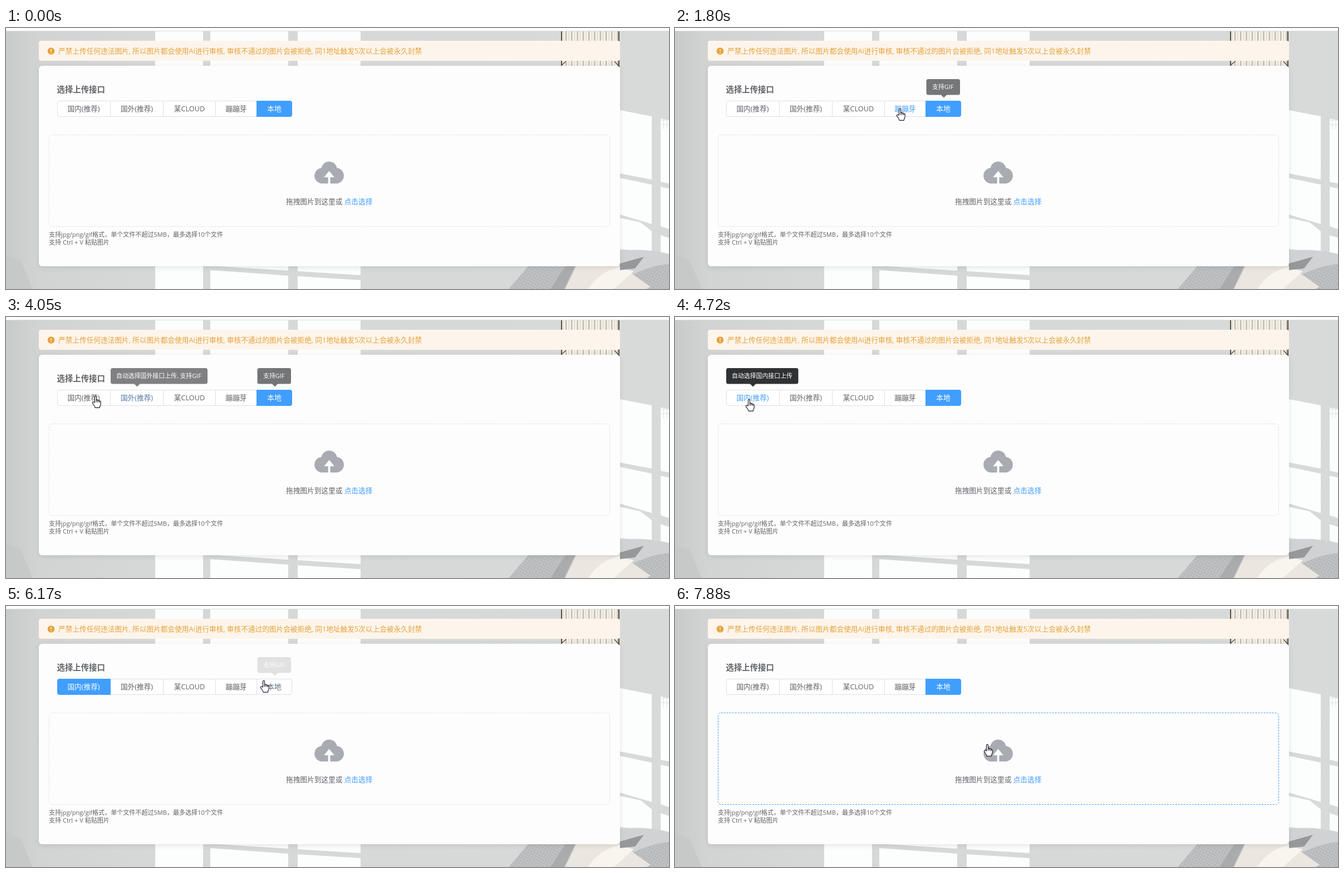
Animation, 1191 px wide and 470 px high, one loop 8000 ms. Source, as an HTML page:

```html
<!DOCTYPE html>
<html lang="zh-CN">
<head>
<meta charset="utf-8">
<title>上传</title>
<style>
html, body { margin: 0; width: 100%; height: 100%; overflow: hidden; background: #d6d8d8; }
svg { display: block; width: 1191px; height: 470px; }
text { font: 12.68px "Open Sans", "Noto Sans CJK SC", "Noto Sans CJK", sans-serif; fill: #606266; white-space: pre; }
.small { font-size: 11.05px; }
.title { font-size: 14.4px; font-weight: 700; }
.warn { fill: #e6a23c; }
.link { fill: #409eff; }
.tab { fill: #fff; stroke: #dcdfe6; }
.on { fill: #409eff; opacity: 0; }
.tip { opacity: 0; }
.tip rect, .tip path { fill: #303133; }
.tip text { fill: #fff; font-size: 10.9px; }

.anim { animation: 8s linear infinite; }
.ease { animation-timing-function: ease-in-out; }
.step { animation-timing-function: step-end; }

/* selected state */
@keyframes on1 { 0%, 60.25% { opacity: 0 } 63.5%, 86.4% { opacity: 1 } 90%, 100% { opacity: 0 } }
@keyframes on4 { 0%, 25% { opacity: 0 } 28.5%, 38.9% { opacity: 1 } 42.5%, 100% { opacity: 0 } }
@keyframes on5 {
  0%, 25% { opacity: 1 } 28.5%, 38.9% { opacity: 0 } 42.5%, 60.25% { opacity: 1 }
  63.5%, 86.4% { opacity: 0 } 90%, 100% { opacity: 1 }
}
/* label colours */
@keyframes ink1 {
  0%, 50.6% { fill: #606266 } 54%, 60.25% { fill: #409eff } 63.5%, 86.4% { fill: #fff } 90%, 100% { fill: #606266 }
}
@keyframes ink2 {
  0%, 48.2% { fill: #606266 } 50.2% { fill: #547aa8 } 53%, 64.7% { fill: #606266 }
  65.8% { fill: #5a6e88 } 67.8%, 100% { fill: #606266 }
}
@keyframes ink4 {
  0%, 18.6% { fill: #606266 } 22%, 25% { fill: #409eff } 28.5%, 38.9% { fill: #fff } 42.5%, 100% { fill: #606266 }
}
@keyframes ink5 {
  0%, 25% { fill: #fff } 28.5%, 30.5% { fill: #606266 } 33.5%, 38.9% { fill: #409eff }
  42.5%, 60.25% { fill: #fff } 63.5%, 76.2% { fill: #606266 } 79.5%, 86.4% { fill: #409eff } 90%, 100% { fill: #fff }
}
/* tooltips */
@keyframes tip1 { 0%, 51% { opacity: 0 } 53.5%, 68.5% { opacity: 1 } 71%, 100% { opacity: 0 } }
@keyframes tip2 {
  0%, 49.125% { opacity: 0 } 51.6%, 52.5% { opacity: 1 } 55%, 65.875% { opacity: 0 }
  68.375%, 70.25% { opacity: 1 } 72.75%, 100% { opacity: 0 }
}
@keyframes tip5 {
  0%, 16.1% { opacity: 0 } 18.2%, 21.6% { opacity: 1 } 24.3%, 30.75% { opacity: 0 }
  33.25%, 49.75% { opacity: 1 } 52.4%, 76.8% { opacity: 0 } 79.3%, 95% { opacity: 1 } 97.5%, 100% { opacity: 0 }
}
@keyframes drop {
  0%, 5.75% { stroke: #dcdfe6 } 9%, 11.25% { stroke: #409eff } 14.75%, 93.5% { stroke: #dcdfe6 } 97%, 100% { stroke: #409eff }
}
/* pointer */
@keyframes show { 0% { opacity: 0 } 5.75%, 100% { opacity: 1 } }
@keyframes hand { 0% { opacity: 1 } 11.25% { opacity: 0 } 15% { opacity: 1 } 64.9% { opacity: 0 } 76.2% { opacity: 1 } 91.9% { opacity: 0 } 93.4%, 100% { opacity: 1 } }
@keyframes arrow { 0% { opacity: 0 } 11.25% { opacity: 1 } 15% { opacity: 0 } 64.9% { opacity: 1 } 76.2% { opacity: 0 } 91.9% { opacity: 1 } 93.4%, 100% { opacity: 0 } }
@keyframes move {
  0%, 5.75% { transform: translate(704px, 312px) }
  7% { transform: translate(708px, 304px) }
  8.5% { transform: translate(726px, 262px) }
  9.75% { transform: translate(744px, 215px) }
  10.5% { transform: translate(742px, 203px) }
  11.25% { transform: translate(708px, 190px) }
  12.25% { transform: translate(640px, 167px) }
  13.25% { transform: translate(573px, 149px) }
  14.75%, 16% { transform: translate(514px, 138px) }
  18.1% { transform: translate(470px, 140px) }
  20% { transform: translate(428px, 144px) }
  21.5%, 26.9% { transform: translate(404px, 145px) }
  28.75% { transform: translate(420px, 146px) }
  31.5% { transform: translate(470px, 142px) }
  33.5%, 43.1% { transform: translate(485px, 141px) }
  45.5% { transform: translate(400px, 145px) }
  47.25% { transform: translate(240px, 144px) }
  48.1%, 49.4% { transform: translate(187px, 143px) }
  50.6%, 51.8% { transform: translate(161px, 142px) }
  54.5% { transform: translate(142px, 146px) }
  58.1%, 63.1% { transform: translate(133px, 148px) }
  64.6% { transform: translate(190px, 138px) }
  65.6% { transform: translate(310px, 116px) }
  66.2% { transform: translate(386px, 98px) }
  66.8% { transform: translate(407px, 92px) }
  67.3% { transform: translate(438px, 85px) }
  67.87%, 69.1% { transform: translate(470px, 76px) }
  70.25%, 70.6% { transform: translate(553px, 60px) }
  72.25% { transform: translate(620px, 64px) }
  73.25% { transform: translate(648px, 86px) }
  74.1% { transform: translate(636px, 112px) }
  74.9% { transform: translate(600px, 138px) }
  75.6% { transform: translate(550px, 147px) }
  76.4% { transform: translate(500px, 142px) }
  77.1%, 80.75% { transform: translate(463px, 134px) }
  83.1%, 90.6% { transform: translate(458px, 135px) }
  92.5% { transform: translate(485px, 172px) }
  94.4% { transform: translate(515px, 215px) }
  96.25%, 96.6% { transform: translate(548px, 243px) }
  98.5%, 100% { transform: translate(561px, 249px) }
}
</style>
</head>
<body>
<svg viewBox="0 0 1191 470">
  <defs>
    <linearGradient id="wall">
      <stop offset="0" stop-color="#c9caca"/>
      <stop offset=".05" stop-color="#d2d3d3"/>
      <stop offset=".2" stop-color="#d6d8d8"/>
      <stop offset="1" stop-color="#d8dada"/>
    </linearGradient>
    <pattern id="knit" width="5" height="5" patternUnits="userSpaceOnUse" patternTransform="rotate(28)">
      <rect width="5" height="5" fill="#c3c4c5"/>
      <path d="M0 1H5M1 0V5" stroke="#b0b1b3"/>
    </pattern>
    <pattern id="bars" x="1003" width="10.3" height="70" patternUnits="userSpaceOnUse">
      <path d="M3 0V70" stroke="#85796a"/>
      <path d="M8 0V70" stroke="#d8d0c2"/>
    </pattern>
    <filter id="shade" x="-5%" y="-5%" width="110%" height="112%">
      <feDropShadow dx="0" dy="2" stdDeviation="4" flood-opacity=".1"/>
    </filter>
  </defs>

  <!-- room -->
  <rect width="1191" height="470" fill="url(#wall)"/>
  <path d="M0 410L26 418 48 470H0Z" fill="#c7c8c8"/>
  <g fill="#fcfdfd">
    <path d="M268 5H354V70H268ZM367 5H507V70H367ZM524 5H637V70H524Z"/>
    <path d="M268 425H354V470H268ZM381 429H507V437ZM524 425H637V445L524 438ZM367 436L507 446V470H367ZM524 447L637 454V470H524Z"/>
    <path d="M1103 148L1160 159V273L1103 262ZM1103 270L1160 282V353L1103 336ZM1176 163L1191 166V280L1176 277ZM1176 286L1191 289V362L1176 357ZM1103 342L1140 350 1160 366V404L1103 398ZM1176 373L1191 378V407L1176 404Z"/>
  </g>
  <path d="M1176 166H1191M1176 174H1191M1181 163V182M1187 164V182" stroke="#dfe1e1" fill="none"/>
  <rect x="997" y="5" width="105" height="65" fill="#f3efe7"/>
  <rect x="997" y="5" width="105" height="65" fill="url(#bars)"/>
  <path d="M998 5V70M1101 5V70" stroke="#5a4d40" stroke-width="2"/>
  <path d="M997 68L1006 60M1093 60L1102 70" stroke="#5a4d40" stroke-width="1.5"/>
  <path d="M903 470L938 429H1060L1010 470Z" fill="url(#knit)"/>
  <path d="M978 470L1005 429H1022L1002 470Z" fill="#a9abac"/>
  <path d="M1103 401Q1150 396 1191 407V470H1103Z" fill="#d0d2d3"/>
  <path d="M1120 447Q1160 427 1191 425V470H1110Z" fill="url(#knit)"/>
  <path d="M1004 470L1024 429H1105L1158 466 1150 470Z" fill="#ebe6df"/>
  <path d="M1046 470Q1064 440 1100 431L1128 438 1092 470Z" fill="#f8f4ee"/>
  <path d="M1103 424L1146 412 1130 433 1103 436Z" fill="#969899"/>
  <rect width="1191" height="5" fill="#fdfdfd"/>
  <path d="M0 5.5H1191" stroke="#dcdede"/>

  <!-- notice -->
  <rect x="59" y="23" width="1044" height="36" rx="4" fill="#fdf5eb"/>
  <circle cx="81" cy="41.5" r="6.3" fill="#e6a23c"/>
  <path d="M81 38V42.2M81 44V45.4" stroke="#fff" stroke-width="1.4"/>
  <text class="warn" x="94" y="46">严禁上传任何违法图片, 所以图片都会使用Ai进行审核, 审核不通过的图片会被拒绝, 同1地址触发5次以上会被永久封禁</text>

  <!-- card -->
  <rect x="59" y="68" width="1044" height="361" rx="6" fill="#fdfdfd" filter="url(#shade)"/>
  <text class="title" x="91.5" y="116">选择上传接口</text>

  <g class="tab">
    <rect x="92.5" y="131.5" width="421" height="28" rx="3.5"/>
    <path d="M187.5 132V159M282.5 132V159M376.5 132V159M450.5 132V159"/>
  </g>
  <path class="on anim ease" style="animation-name:on1" d="M96 131H188V160H96Q92 160 92 156V135Q92 131 96 131Z"/>
  <path class="on anim ease" style="animation-name:on4" d="M376 131H451V160H376Z"/>
  <path class="on anim ease" style="animation-name:on5" d="M450 131H510Q514 131 514 135V156Q514 160 510 160H450Z"/>
  <g text-anchor="middle">
    <text class="anim ease" style="animation-name:ink1" x="139.5" y="150">国内(推荐)</text>
    <text class="anim ease" style="animation-name:ink2" x="235" y="150">国外(推荐)</text>
    <text x="329.5" y="150">某CLOUD</text>
    <text class="anim ease" style="animation-name:ink4" x="413.5" y="150">蹦蹦芽</text>
    <text class="anim ease" style="animation-name:ink5" x="482" y="150">本地</text>
  </g>

  <rect class="anim ease" style="animation-name:drop" x="77.5" y="192.5" width="1007" height="165" rx="5" fill="none" stroke="#dcdfe6" stroke-dasharray="3 2"/>
  <path transform="translate(550.4 229.2) scale(.0589)" fill="#a8abb2" d="M544 864V672h128L512 480 352 672h128v192H304A240 240 0 0 1 64 624c0-123 93-223 212.6-237.2A240 240 0 0 1 512 192a240 240 0 0 1 235.4 194.8C867 400.5 960 501 960 624a240 240 0 0 1-240 240Z"/>
  <text x="503" y="317">拖拽图片到这里或 <tspan class="link">点击选择</tspan></text>
  <text class="small" x="77" y="375.5">支持jpg/png/gif格式，单个文件不超过5MB，最多选择10个文件</text>
  <text class="small" x="77" y="390">支持 Ctrl + V 粘贴图片</text>

  <!-- tooltips -->
  <g class="tip anim" style="animation-name:tip1">
    <rect x="92" y="92" width="129.5" height="28.5" rx="3.5"/>
    <path d="M134.5 120H145.5L140 125.5Z"/>
    <text x="102" y="110">自动选择国内接口上传</text>
  </g>
  <g class="tip anim" style="animation-name:tip2">
    <rect x="188" y="92" width="174" height="28.5" rx="3.5"/>
    <path d="M230 120H241L235.5 125.5Z"/>
    <text x="198" y="110">自动选择国外接口上传, 支持GIF</text>
  </g>
  <g class="tip anim" style="animation-name:tip5">
    <rect x="451.5" y="92" width="60.5" height="28.5" rx="3.5"/>
    <path d="M477.5 120H488.5L483 125.5Z"/>
    <text x="462" y="110">支持GIF</text>
  </g>

  <!-- pointer -->
  <g class="anim step" style="animation-name:show">
    <g class="anim" style="animation-name:move" fill="#fff" stroke="#1c1c28" stroke-width="1.2" stroke-linejoin="round">
      <path class="anim step" style="animation-name:hand" d="M-1.5 12V1.8C-1.5 0 1.5 0 1.5 1.8V8C1.8 6.6 4 6.8 4.1 8.4 4.6 7.4 6.6 7.8 6.7 9.4 7.4 8.6 9.2 9.2 9.2 10.8V14.5C9.2 17 7.4 18 7.2 21.3H-.8C-1 18.8-3.6 16.4-5.4 13.4-6.3 11.6-4 10.2-2.8 11.2ZM1.5 8V11.5M4.1 8.4V11.5M6.7 9.4V12"/>
      <path class="anim step" style="animation-name:arrow" d="M.5 0V14.5L3.7 11.5 6 16.8 8.2 15.9 5.9 10.7H10.2Z"/>
    </g>
  </g>
</svg>
</body>
</html>
```
